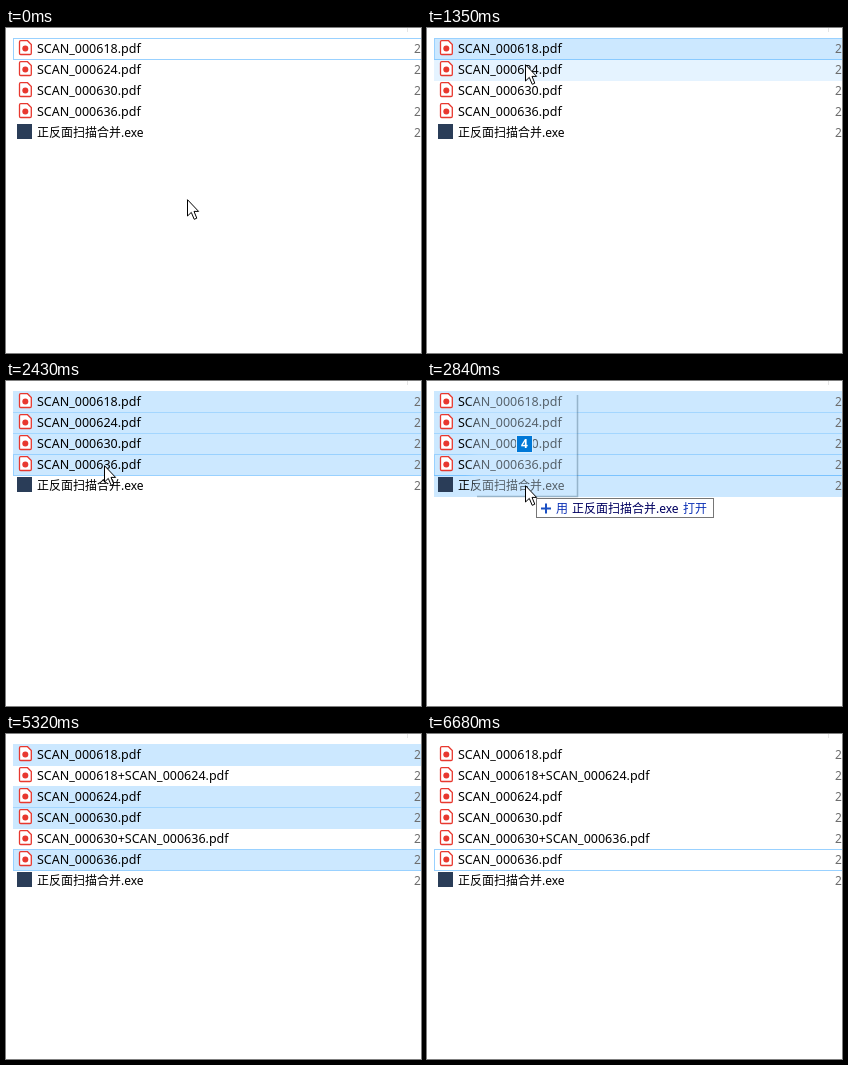
Write an HTML page that moves like this. It is 415 px wide and 325 px high and loops after 7080 ms.

```html
<!DOCTYPE html>
<html lang="zh">
<head>
<meta charset="utf-8">
<title>File list</title>
<style>
  html, body { margin: 0; width: 100%; height: 100%; overflow: hidden; background: #fff; }
  svg { display: block; }
  text { font: 12px "Noto Sans", "Noto Sans CJK SC", "Noto Sans CJK", sans-serif; white-space: pre; }
  .pdf { font-size: 12.5px; }
  .date { fill: #6d6d6d; }
  .badge { font-weight: 700; }
  /* Rows overlap by one pixel, so neighbouring fills darken into a line */
  .bar { fill: none; }
  .hover { fill: rgba(0, 140, 255, .1); }
  .focus-hover { fill: #d8e9f9; }
  .selected { fill: rgba(0, 140, 255, .2); }
  .inactive { fill: rgba(0, 0, 0, .149); }
  .outline { fill: none; stroke: #99d1ff; }
</style>
</head>
<body>
<svg width="415" height="325" viewBox="0 0 415 325">
  <defs>
    <linearGradient id="fade">
      <stop offset="0" stop-color="#cce8ff" stop-opacity="0"/>
      <stop offset=".12" stop-color="#cce8ff" stop-opacity=".42"/>
      <stop offset="1" stop-color="#cce8ff" stop-opacity=".42"/>
    </linearGradient>
    <g id="page">
      <path d="M14.7 12.7H21.5L25.3 16.5V25.2Q25.3 26.5 24 26.5H14.7Q13.5 26.5 13.5 25.2V13.9Q13.5 12.7 14.7 12.7Z"
        fill="#fff" stroke="#e8382f" stroke-width="1.3"/>
      <circle cx="19.3" cy="20.6" r="3" fill="#e8382f"/>
    </g>
    <rect id="app" x="11" y="12" width="15" height="15" fill="#2a3d58"/>
  </defs>
  <path d="M401.5 0V4" stroke="#e5e5e5"/>
  <g id="list"></g>
  <g id="drag">
    <rect x="38" y="12" width="112" height="103" fill="url(#fade)"/>
    <path d="M50 115.5H150.5V14" fill="none" stroke="#55748c" stroke-opacity=".45" stroke-width="1.5"/>
    <rect x="89.5" y="54.5" width="16" height="17" fill="#0078d7" stroke="#d8eeff"/>
    <text class="badge" x="94" y="67" fill="#fff">4</text>
    <rect x="109.5" y="117.5" width="177" height="19" fill="#fff" stroke="#767676"/>
    <path d="M114 127.5H124M119 122.5V132.5" stroke="#1a4fc4" stroke-width="2"/>
    <g fill="#0a2fb5">
      <text x="129" y="132">用</text>
      <text x="145" y="132" fill="#000060">正反面扫描合并.exe</text>
      <text x="256" y="132">打开</text>
    </g>
  </g>
  <path id="cursor" d="M.5 .7V17L4.3 13.4L7.2 20.3L9.8 19.2L7 12.4H11.6Z" fill="#fff" stroke="#000"/>
</svg>
<script>
  const LOOP = 7080, PITCH = 21;
  const $ = id => document.getElementById(id);

  // Capitals also carry the focus outline
  const looks = { h: 'hover', H: 'focus-hover', s: 'selected', S: 'selected outlined', F: 'outlined', g: 'inactive' };

  const scan = n => `SCAN_000${n}`;
  const app = '正反面扫描合并.exe';
  const before = [scan(618), scan(624), scan(630), scan(636), app];
  const after = [scan(618), scan(618) + '+' + scan(624), scan(624),
    scan(630), scan(630) + '+' + scan(636), scan(636), app];

  // Start time, look of each row, pointer tip (none: hidden), dragging
  const steps = [
    [0, 'F....', [181, 171]],
    [300, 'F....', [158, 124]],
    [420, 'Fh...', [116, 48]],
    [540, 'H....', [98, 13]],
    [810, 'H....', [98, 18]],
    [1200, 'S....', [98, 18]],
    [1350, 'Sh...', [98, 36]],
    [1475, 'S.h..', [97, 62]],
    [1600, 'S..h.', [96, 80]],
    [1750, 'S..h.', [95, 85]],
    [2020, 'sssS.', [95, 85]],
    [2430, 'sssS.', [98, 84]],
    [2570, 'sssS.', [98, 83]],
    [2700, 'sssS.', [98, 101]],
    [2840, 'sssSs', [98, 104], true],
    [3340, 'sssSh', [98, 104]],
    [3460, 'ggggh', [98, 104]],
    [3580, 'gggg.'],
    [5320, 's.ss.S.'],
    [5440, 's.ss.S.', [150, 170]],
    [5560, 's.ss.S.', [214, 239]],
    [5710, 's.ss.S.', [300, 280]],
    [5830, 's.ss.S.', [376, 304]],
    [5980, 's.ss.S.', [318, 276]],
    [6100, 's.ss.S.', [282, 256]],
    [6250, '.....F.', [282, 256]],
    [6530, '.....F.', [356, 303]],
    [6680, '.....F.'],
  ];

  function row(name, look = '', i) {
    const isApp = name === app;
    const y = i * PITCH;
    const outline = look.includes('outlined')
      ? `<rect class="outline" x="7.5" y="${y + 10.5}" width="420" height="21"/>` : '';
    return `<rect class="bar ${look}" x="7" y="${y + 10}" width="420" height="22"/>${outline}
      <use href="#${isApp ? 'app' : 'page'}" y="${y}"/>
      <text class="${isApp ? '' : 'pdf'}" x="31" y="${y + 25}">${isApp ? name : name + '.pdf'}</text>
      <text class="date" x="408" y="${y + 25}">2</text>`;
  }

  function show([, rows, tip, dragging]) {
    const names = rows.length === before.length ? before : after;
    $('list').innerHTML = names.map((name, i) => row(name, looks[rows[i]], i)).join('');
    $('drag').style.display = dragging ? '' : 'none';
    $('cursor').style.display = tip ? '' : 'none';
    if (tip) $('cursor').setAttribute('transform', `translate(${tip})`);
  }

  const start = performance.now();
  let current;
  function tick() {
    const t = (performance.now() - start) % LOOP;
    const step = steps.filter(s => s[0] <= t).pop();
    if (step !== current) show(current = step);
    requestAnimationFrame(tick);
  }
  tick();
</script>
</body>
</html>
```
